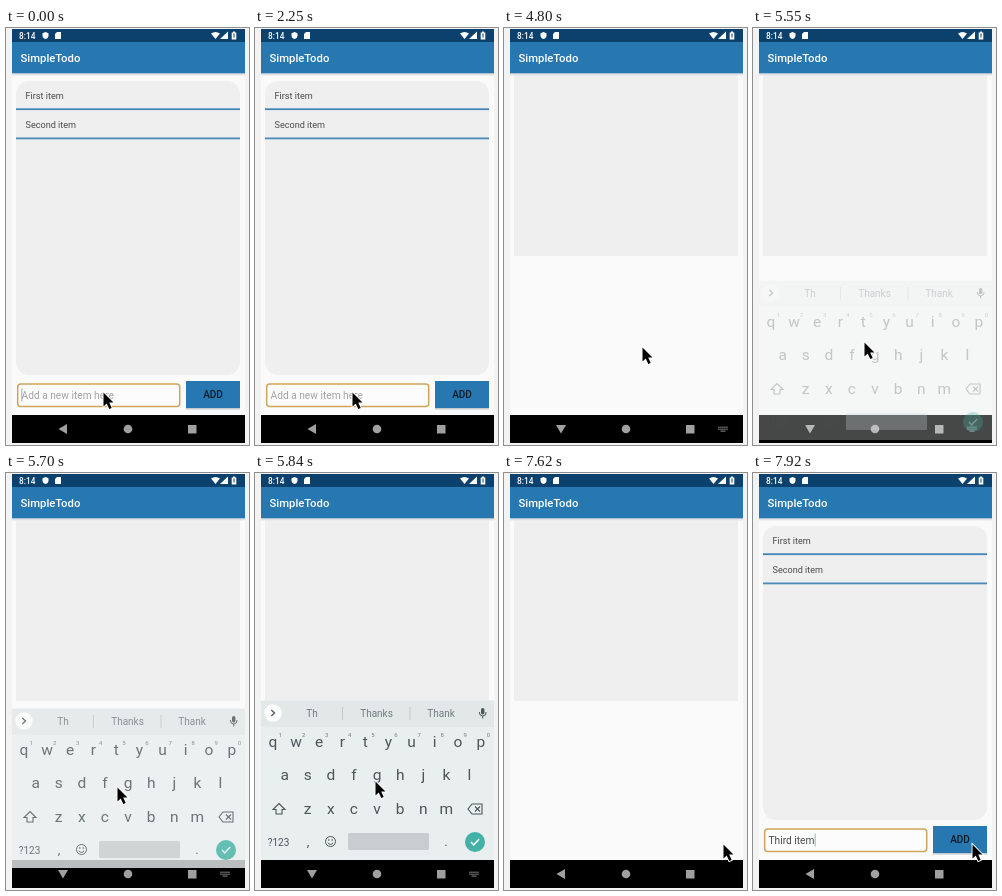
An HTML page with a canvas for the animation above (8 s loop, 243 by 417 pixels).

```html
<!DOCTYPE html>
<html lang="en">
<head>
<meta charset="utf-8">
<title>Todo list demo</title>
<style>
html, body { margin: 0; width: 100%; height: 100%; overflow: hidden; background: #f3f3f3; }
canvas { display: block; width: 243px; height: 417px; }
</style>
</head>
<body>
<canvas id="stage"></canvas>
<script>
const LOOP = 8000, BLUE = '#2777b1';
const canvas = document.getElementById('stage');
const ctx = canvas.getContext('2d');
const scale = window.devicePixelRatio || 1;
canvas.width = 243 * scale;
canvas.height = 417 * scale;

// Pointer tip: [time, x, y], each held until the next
const pointerSteps = [
  [0, 97, 364], [4800, 138, 319], [4950, 129, 262], [5100, 116, 236], [5250, 111, 314],
  [5840, 120, 308], [5990, 143, 292], [6130, 168, 276], [6280, 184, 267], [6430, 191, 264],
  [6570, 170, 325], [6720, 203, 352], [6870, 219, 371]
];
const caretToggles = [300, 750, 1350, 1800, 2250, 2700];

function rect(x, y, w, h, color) {
  ctx.fillStyle = color;
  ctx.fillRect(x, y, w, h);
}

function round(x, y, w, h, r, fill, stroke) {
  ctx.beginPath();
  ctx.roundRect(x, y, w, h, r);
  if (fill) { ctx.fillStyle = fill; ctx.fill(); }
  if (stroke) { ctx.strokeStyle = stroke; ctx.stroke(); }
}

function circle(x, y, r, fill) {
  ctx.beginPath();
  ctx.arc(x, y, r, 0, 7);
  ctx.fillStyle = fill;
  ctx.fill();
}

function path(d, x, y, fill, stroke, width = 1) {
  const shape = new Path2D(d);
  ctx.save();
  ctx.translate(x, y);
  ctx.lineWidth = width;
  if (stroke) { ctx.strokeStyle = stroke; ctx.stroke(shape); }
  if (fill) { ctx.fillStyle = fill; ctx.fill(shape); }
  ctx.restore();
}

function text(str, x, y, size, color, align = 'left', weight = 400) {
  ctx.font = `${weight} ${size}px Roboto, sans-serif`;
  ctx.textAlign = align;
  ctx.fillStyle = color;
  ctx.fillText(str, x, y);
}

function drawBars(keyboardIcon) {
  rect(6, 1, 233, 13, '#0b416c');
  text('8:14', 13, 10.5, 8.3, '#fff', 'left', 500);
  path('M0-3.5L3-2.3V0Q3 2.6 0 3.6Q-3 2.6-3 0V-2.3Z', 39.5, 7.5, '#fff');
  path('M-1-3.5H3V3.5H-3V-1.5Z', 52, 7.5, '#fff');
  path('M0 3.5L-4.5-2Q0-5 4.5-2Z', 209.5, 7.5, '#fff');
  path('M4 3.5H-4L4-4Z', 218, 7.5, '#fff');
  path('M-1-4H1V-3H2.3V4H-2.3V-3H-1Z', 228, 7.5, '#fff');
  rect(227.5, 5.5, 1, 4, '#0b416c');

  rect(6, 14, 233, 31.5, BLUE);
  rect(6, 45.5, 233, 1, '#c4ccd2');
  rect(6, 46.5, 233, 1, '#e6e8e9');
  text('SimpleTodo', 14.5, 34, 11.3, '#fff', 'left', 500);

  const gray = '#a0a0a0';
  rect(6, 387, 233, 28, '#000');
  path(keyboardIcon ? 'M-5-4H5L0 4.5Z' : 'M4-5V5L-4.5 0Z', 57, 401, gray);
  circle(122, 401, 4.3, gray);
  rect(182, 397, 8.5, 8.5, gray);
  if (keyboardIcon) {
    for (let row = 0; row < 2; row++)
      for (let i = 0; i < 5; i++) rect(214.3 + i * 2, 398.6 + row * 2, 1.3, 1.3, '#8a8a8a');
    rect(216.5, 402.6, 5, 1, '#8a8a8a');
  }
}

function drawList(value, caret) {
  round(10, 53, 224, 294, 13, '#efefef');
  text('First item', 19.5, 71, 9.1, '#4a4a4a');
  text('Second item', 19.5, 99.5, 9.1, '#4a4a4a');
  rect(10, 80.3, 224, 1.8, '#4584b6');
  rect(10, 109.5, 224, 1.8, '#4c8aba');

  ctx.lineWidth = 1.5;
  round(11.7, 356, 162, 22.5, 3, '#fcfcfc', '#cfa55c');
  text(value || 'Add a new item here', 15.5, 371, 10.2, value ? '#4a4a4a' : '#a3a3a3');
  const caretX = value ? 15.7 + ctx.measureText(value).width : 15.3;
  if (caret) rect(caretX, 360.5, 1, 13, '#8fb0c6');

  rect(180, 380, 54, 1.5, '#c5cacd');
  rect(180, 353, 54, 27, BLUE);
  text('ADD', 207, 370.3, 10, '#0b1a26', 'center', 500);
}

function drawKeyboard(offset, alpha, words) {
  const ink = '#4b555a';
  ctx.save();
  ctx.beginPath();
  ctx.rect(6, 46, 233, 369);
  ctx.clip();
  ctx.globalAlpha = alpha;
  ctx.translate(0, offset);
  rect(6, 227.5, 233, 26.5, '#e2e7e8');
  rect(6, 254, 233, 133, '#e9eeef');

  circle(18, 240, 8.7, '#fff');
  path('M-1.7-3L1.5 0L-1.7 3', 18, 240, null, ink, 1.3);
  words.forEach((word, i) => text(word, 57 + i * 64.5, 243.7, 10, '#737c80', 'center'));
  rect(87, 234, 1, 13, '#c3c9cb');
  rect(154.5, 234, 1, 13, '#c3c9cb');
  round(226, 235, 3.4, 6.5, 1.7, ink);
  path('M-3.4-1Q-3.4 3 0 3Q3.4 3 3.4-1M0 3V5.5', 227.7, 240, null, ink);

  [['qwertyuiop', 18, 274], ['asdfghjkl', 29.7, 307], ['zxcvbnm', 52.7, 340.5]]
    .forEach(([keys, x, y]) => [...keys].forEach((key, i) => {
      text(key, x + i * 23.1, y, 15.5, ink, 'center');
      if (y === 274) text((i + 1) % 10, x + 7.5 + i * 23.1, 263.5, 6, '#737c80', 'center');
    }));

  path('M0-5.5L6 .5H3V5H-3V.5H-6Z', 24, 336, null, ink, 1.1);
  path('M-3-5H7V5H-3L-7 0ZM0-2.5L5 2.5M5-2.5L0 2.5', 220, 336, null, ink, 1.1);
  text('?123', 23.5, 372.5, 10, ink, 'center');
  text(',', 53, 373, 13, ink, 'center');
  path('M5 0A5 5 0 1 1-5 0A5 5 0 1 1 5 0M-2.7 1.2Q0 4.6 2.7 1.2', 75.5, 368.5, null, ink);
  circle(73.8, 367, .8, ink);
  circle(77.2, 367, .8, ink);
  round(93, 360, 81, 17, 1.5, '#c8cdcf');
  text('.', 191, 373, 13, ink, 'center');
  circle(220, 369, 10, '#43b1a5');
  path('M-4 0L-1.3 3L4.2-3', 220, 369, null, '#fff', 1.5);
  ctx.restore();
}

function drawPointer(t) {
  const [, x, y] = pointerSteps.findLast(step => step[0] <= t);
  path('M0 0V14L3.2 11L5.8 16.6L8.2 15.5L5.7 10H10Z', x + .5, y + .5, '#000', '#fff', 1.8);
}

function draw(t) {
  ctx.setTransform(scale, 0, 0, scale, 0, 0);
  rect(0, 0, 243, 417, '#f3f3f3');
  rect(6, 1, 233, 414, '#fafafa');
  const resizing = t >= 3450 && t < 7920;
  if (resizing) rect(10, 46, 224, 182, '#efefef');
  drawBars(t >= 2850 && t < 7620);

  if (!resizing) {
    const caret = t >= 2700 || caretToggles.filter(time => time <= t).length % 2 === 0;
    drawList(t >= 7920 ? 'Third item' : t >= 3150 ? 'T' : '', caret);
  } else if (t >= 5550 && t < 6570) {
    const [offset, alpha] = t < 5700 ? [25, .3] : t < 5840 ? [8, .8] : [0, 1];
    const words = t < 6130 ? ['Th', 'Thanks', 'Thank'] : ['Third', 'Thurs', 'Third-party'];
    drawKeyboard(offset, alpha, words);
  }
  drawPointer(t);
}

const start = performance.now();
function tick() {
  draw((performance.now() - start) % LOOP);
  requestAnimationFrame(tick);
}
tick();
</script>
</body>
</html>
```
